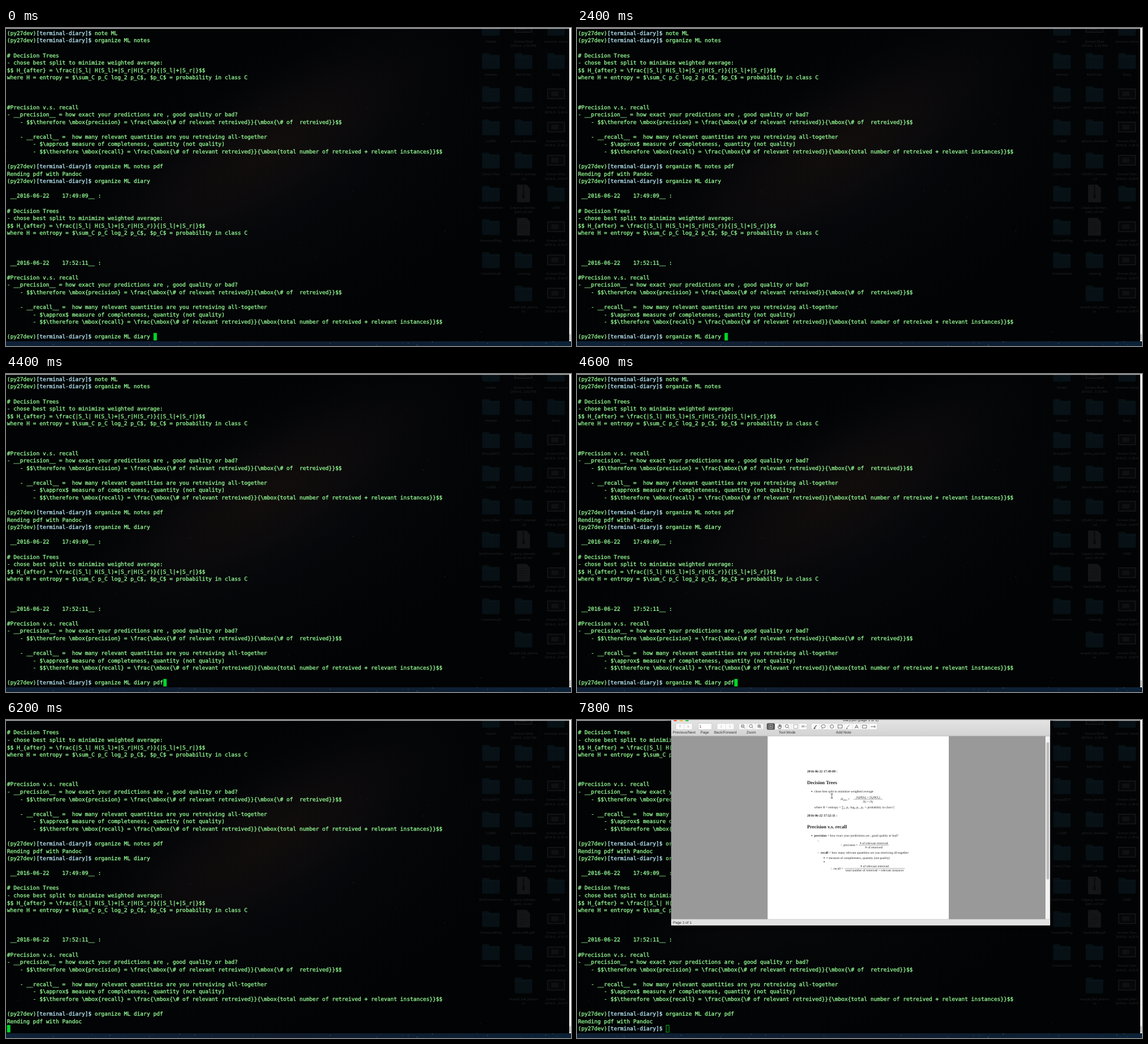
An HTML page for the animation above (8 s loop, 960 px wide and 540 px high).

```html
<!DOCTYPE html>
<html lang="en">
<head>
<meta charset="utf-8">
<title>Terminal diary</title>
<style>
html, body { margin: 0; width: 100%; height: 100%; overflow: hidden; background: #020304; }
svg { display: block; width: 100vw; height: 100vh; }
text { white-space: pre; text-rendering: geometricPrecision; }
.term { font: 9.19px "DejaVu Sans Mono", monospace; fill: #92f892; stroke: #92f892; stroke-width: .32; }
.dir { fill: #b6e8f4; stroke: #b6e8f4; }
.label { font: bold 5.6px "Open Sans", sans-serif; fill: #2b2c2e; text-anchor: middle; }
.ui { font: 6.2px "Liberation Sans", Arial, sans-serif; fill: #333; }
.mid { text-anchor: middle; }
.doc { font: 5.45px "Liberation Serif", Times, serif; fill: #222; }
.head { font-size: 8.3px; font-weight: bold; }
.date { font-size: 5.65px; font-weight: bold; }
</style>
</head>
<body>
<svg id="stage" viewBox="0 0 960 540" preserveAspectRatio="none"></svg>
<script>
const LOOP = 8000, STEP = 200;
const COL = 5.532, ROW = 12.57, LEFT = 1.7, BASE = 11.9;
const TYPE = [3200, 3400, 3600], ENTER = 4800, DONE = 7000, OPEN = 7400;

const stage = document.getElementById('stage');
const esc = s => s.replace(/&/g, '&amp;').replace(/</g, '&lt;');
const rect = (x, y, w, h, fill, more = '') =>
  `<rect x="${x}" y="${y}" width="${w}" height="${h}" fill="${fill}" ${more}/>`;
const text = (x, y, s, cls) => `<text x="${x}" y="${y}" class="${cls}">${s}</text>`;
const path = (d, color = '#555', w = .8) =>
  `<path d="${d}" fill="none" stroke="${color}" stroke-width="${w}"/>`;

function rng(seed) {
  return () => (seed = (seed * 16807) % 2147483647) / 2147483647;
}

// Terminal contents
const PROMPT = '(py27dev)[terminal-diary]$ ';
const trees = [
  '# Decision Trees',
  '- chose best split to minimize weighted average:',
  '$$ H_{after} = \\frac{|S_l| H(S_l)+|S_r|H(S_r)}{|S_l|+|S_r|}$$',
  'where H = entropy = $\\sum_C p_C log_2 p_C$, $p_C$ = probability in class C',
  '', '', ''
];
const recall = [
  '#Precision v.s. recall',
  '- __precision__ = how exact your predictions are , good quality or bad?',
  '    - $$\\therefore \\mbox{precision} = \\frac{\\mbox{\\# of relevant retreived}}{\\mbox{\\# of  retreived}}$$',
  '',
  '    - __recall__ =  how many relevant quantities are you retreiving all-together',
  '        - $\\approx$ measure of completeness, quantity (not quality)',
  '        - $$\\therefore \\mbox{recall} = \\frac{\\mbox{\\# of relevant retreived}}{\\mbox{total number of retreived + relevant instances}}$$',
  ''
];
const history = [
  PROMPT + 'note ML', PROMPT + 'organize ML notes', '',
  ...trees, ...recall,
  PROMPT + 'organize ML notes pdf', 'Rending pdf with Pandoc',
  PROMPT + 'organize ML diary', '',
  ' __2016-06-22    17:49:09__ :', '', ...trees,
  ' __2016-06-22    17:52:11__ :', '', ...recall
];

function line(s, row) {
  const body = esc(s).replace('[terminal-diary]$', '<tspan class="dir">$&</tspan>');
  return s && text(LEFT, (BASE + row * ROW).toFixed(2), body, 'term');
}

// Dimmed desktop behind the terminal
function stars(n, seed, top, height, color, alpha) {
  const r = rng(seed);
  let out = '';
  for (let i = 0; i < n; i++) {
    out += `<circle cx="${(r() * 957).toFixed(1)}" cy="${(top + r() * height).toFixed(1)}" r="${(.3 + r() * .5).toFixed(2)}" fill="${color}" opacity="${(r() * alpha).toFixed(2)}"/>`;
  }
  return out;
}

const icons = {
  f: (x, y) => `<path d="M${x - 15} ${y + 12}v-23q0-2 2-2h9l3 3h14q2 0 2 2v20q0 2-2 2h-26q-2 0-2-2" fill="#0b1c24"/>` +
    rect(x - 15, y - 8, 30, 1, '#12272f'),
  s: (x, y) => rect(x - 15, y - 9, 30, 18, '#27292b') + rect(x - 13.5, y - 7.5, 27, 15, '#0a0b0d') +
    rect(x - 8, y - 4, 12, 8, '#1b1c1e'),
  d: (x, y) => `<path d="M${x - 11} ${y - 15}h16l6 6v24h-22z" fill="#222527"/>` +
    path(`M${x - 7} ${y - 7}h11m-11 4h14m-14 4h14m-14 4h14m-14 4h9`, '#15181a'),
  z: (x, y) => `<path d="M${x - 11} ${y - 15}h16l6 6v24h-22z" fill="#222527"/>` +
    path(`M${x} ${y - 14}v16`, '#0d0f10', 2) + rect(x - 2, y + 2, 4, 6, '#0d0f10')
};
const shot = s => 's:Screen Shot/2016-0...' + s;
const desktop = [
  ['f:Studio', 'f:memos', 'f:Group2017', 'f:LLZ0K', 'f:Curio_Files', 'f:StatFormation', 'f:PersonalPlog', 'f:CreationLab'],
  [shot('3.52 PM'), 'f:Red Print', 'f:extra_journal', 'f:phone_shielded', 'f:LEGACY_stamps/_v2',
    'z:Legacy_stamps_/pats_v2.tar', 'd:hw4cs189.pdf', 'f:_moving', 'f:stupid_kid_pheno/cs'],
  ['f:seminar notes', 'f:Daily', shot('3.48 A'), shot('2.38 A'), shot('0.09 P'), 'f:LABS',
    shot('4.35 P'), shot('4.43 P'), shot('4.09 P')]
];

function drawDesktop() {
  let out = '';
  desktop.forEach((items, c) => items.forEach((item, r) => {
    const x = 824 + c * 55.3, y = -1 + r * 56.4;
    out += icons[item[0]](x, y);
    item.slice(2).split('/').forEach((s, i) => out += text(x, y + 25.5 + i * 7.5, s, 'label'));
  }));
  return `<g opacity=".55">${out}</g>`;
}

// PDF viewer window
const sub = s => s.replace(/_(\w+)/g, '<tspan baseline-shift="-1" font-size="3.8">$1</tspan>')
  .replace(/\*(\w)/g, '<tspan font-style="italic">$1</tspan>');
const doc = (x, y, s, cls = '') => text(x, y, sub(s), 'doc ' + cls);
const dot = (x, y) => `<circle cx="${x}" cy="${y}" r=".9" fill="#222"/>`;

function fraction(x, w, y, top, bottom) {
  return doc(x + w / 2, y - 1.7, top, 'mid') + doc(x + w / 2, y + 5.2, bottom, 'mid') +
    path(`M${x} ${y}h${w}`, '#333', .4);
}

function buttons(x, w, n) {
  let out = rect(x, 5, w, 10.5, '#fbfbfb', 'rx="2" stroke="#bbb" stroke-width=".5"');
  for (let i = 1; i < n; i++) out += path(`M${x + w * i / n} 5v10.5`, '#ccc', .5);
  return out;
}

const lens = (x, sign = '') =>
  `<circle cx="${x}" cy="9.6" r="2.6" fill="none" stroke="#555" stroke-width=".8"/>` +
  path(`M${x + 2} 11.6l2 2${sign}`);

function drawToolbar() {
  const labels = [[182, 'Previous/Next'], [217, 'Page'], [252, 'Back/Forward'],
    [296, 'Zoom'], [357, 'Tool Mode'], [453, 'Add Note']];
  return rect(160, -10, 644, 36.5, 'url(#bar)') +
    ['#f66158', '#f7be40', '#3fc24c'].map((c, i) => `<circle cx="${167 + i * 10}" cy="-1.7" r="3.3" fill="${c}"/>`).join('') +
    text(482, 1.6, 'diary.pdf (page 1 of 1)', 'ui mid') +
    buttons(168, 28, 2) + path('M175 12v-4m-2 2l2-2l2 2M189 8v4m-2-2l2 2l2-2', '#bbb') +
    rect(206, 5, 23, 10.5, '#fff', 'stroke="#aaa" stroke-width=".5"') + text(208, 12.6, '1', 'ui') +
    buttons(238, 29, 2) + path('M246 8l-2 2.3l2 2.3M259 8l2 2.3l-2 2.3', '#bbb') +
    buttons(275, 42, 3) + lens(281.5, 'M280 9.6h3') + lens(295.5) + lens(309.5, 'M308 9.6h3M309.5 8.1v3') +
    buttons(323, 68, 5) + rect(322.5, 4.8, 13.6, 11, '#555', 'rx="2"') +
    rect(326, 7, 6.6, 6.5, 'none', 'stroke="#eee" stroke-width=".5"') +
    '<text x="329.3" y="12.4" class="ui mid" style="fill:#fff;font-size:5.5px">A</text>' +
    path('M341 10l2 4h3l1-3v-3m-4 3v-4m1.5 4v-4.5m1.5 4.5v-4', '#555', 1) + lens(356.5) +
    rect(368, 7, 7, 6.5, 'none', 'stroke="#555" stroke-width=".8" stroke-dasharray="1 .8"') +
    text(384, 12.6, 'H', 'ui mid') + path('M388 9.5l1 1.5l1-1.5', '#555', .6) +
    buttons(398, 112, 8) +
    path('M403 13l4-5M402 13.5h3', '#555', 1.3) +
    '<g fill="none" stroke="#555" stroke-width=".8"><ellipse cx="418.5" cy="9.8" rx="3.6" ry="2.7"/>' +
    '<circle cx="433" cy="10.2" r="3"/><rect x="443.5" y="7.4" width="7" height="5.6"/></g>' +
    path('M417 12.5l-1 2M458 13l5-5.5M457 13.8h3M472 13.5l3-6l3 6M473 11.5h4M485 8h7v5h-7zM499 10.5h8m-2-2l2 2l-2 2') +
    labels.map(([x, s]) => text(x, 22.3, s, 'ui mid')).join('') +
    path('M160 26.3h644', '#aaa', .6);
}

function drawPage() {
  return doc(391, 88, '2016-06-22 17:49:09 :', 'date') +
    doc(391, 108, 'Decision Trees', 'head') +
    dot(399, 120.5) + doc(403, 121.8, 'chose best split to minimize weighted average:') +
    doc(448, 135.5, '*H_after =') +
    fraction(470, 49, 133.6, '|*S_l|*H(*S_l) + |*S_r|*H(*S_r)', '|*S_l| + |*S_r|') +
    doc(403, 149.5, 'where H = entropy = ∑_C *p_C log_2 *p_C, *p_C = probability in class C') +
    doc(391, 163.5, '2016-06-22 17:52:11 :', 'date') +
    doc(391, 183.5, 'Precision v.s. recall', 'head') +
    dot(399, 195.5) + doc(403, 197, '<tspan font-weight="bold">precision</tspan> = how exact your predictions are , good quality or bad?') +
    doc(408.5, 206, '–') + doc(448, 213.5, '∴ precision =') +
    fraction(479, 51, 211.7, '# of relevant retreived', '# of retreived') +
    doc(408.5, 226, '–') + doc(414, 226, '<tspan font-weight="bold">recall</tspan> = how many relevant quantities are you retreiving all-together') +
    dot(420, 233.3) + doc(423.5, 234.8, '≈ measure of completeness, quantity (not quality)') +
    dot(420, 239.8) + doc(431, 253, '∴ recall =') +
    fraction(454.5, 102.5, 251.3, '# of relevant retreived', 'total number of retreived + relevant instances');
}

function drawViewer() {
  return rect(160, -10, 644, 358, '#999', 'rx="3" filter="url(#shadow)"') +
    rect(160, 26, 644, 312, '#999') + rect(323.5, 26, 308.5, 311.5, '#fff') +
    path('M323.3 26v311.5M632.2 26v311.5', '#777', .5) +
    rect(796, 26.5, 7.5, 311, '#f3f3f3') + rect(797.7, 37, 4.4, 233, '#bcbcbc', 'rx="2.2"') +
    rect(160, 337.5, 644, 10.5, '#e2e2e2') + text(163, 345.2, 'Page 1 of 1', 'ui') +
    drawToolbar() + drawPage();
}

stage.innerHTML = `
<defs>
  <radialGradient id="core"><stop offset="0" stop-color="#130e0b" stop-opacity=".9"/><stop offset=".45" stop-color="#0f0c0d" stop-opacity=".65"/><stop offset="1" stop-color="#08090c" stop-opacity="0"/></radialGradient>
  <radialGradient id="haze"><stop offset="0" stop-color="#080a0e" stop-opacity=".8"/><stop offset="1" stop-color="#05070a" stop-opacity="0"/></radialGradient>
  <linearGradient id="sky"><stop offset="0" stop-color="#0e2137"/><stop offset=".5" stop-color="#101c2e"/><stop offset="1" stop-color="#0b2136"/></linearGradient>
  <linearGradient id="bar" x2="0" y2="1"><stop offset="0" stop-color="#e8e8e8"/><stop offset="1" stop-color="#d3d3d3"/></linearGradient>
  <filter id="shadow" x="-10%" y="-10%" width="120%" height="125%"><feDropShadow dx="0" dy="5" stdDeviation="7" flood-color="#000" flood-opacity=".6"/></filter>
</defs>
${rect(0, 0, 960, 540, '#020304')}
<ellipse cx="480" cy="270" rx="560" ry="250" fill="url(#haze)" transform="rotate(-28 480 270)"/>
<ellipse cx="450" cy="205" rx="400" ry="130" fill="url(#core)" transform="rotate(-31 450 205)"/>
${stars(110, 41, 3, 525, '#6d7686', .35)}
${drawDesktop()}
${rect(0, 532, 960, 8, 'url(#sky)')}${stars(60, 77, 532, 8, '#7fa6c8', .7)}
${rect(0, 0, 957, 1.3, '#bdbdbd')}${rect(957, 0, 3, 532, '#f4f4f4')}${rect(957.5, 520, 2, 10, '#bbb')}
<g id="log">${history.map(line).join('')}</g>
<g id="tail"></g>
<rect id="cursor" stroke="#00d826"/>
<g id="viewer">${drawViewer()}</g>
<path id="arrow" d="M431 128v8.5l2-1.8l1.4 3.2l1.4-.6l-1.4-3.1h2.7z" fill="#111" stroke="#ccc" stroke-width=".6"/>
<g id="beam">${path('M431 125q2 0 2 1.2q0-1.2 2-1.2M433 126v6M431 133q2 0 2-1.2q0 1.2 2 1.2', '#222', .7)}</g>`;

const el = id => document.getElementById(id);
const [log, tail, cursor, viewer, arrow, beam] = ['log', 'tail', 'cursor', 'viewer', 'arrow', 'beam'].map(el);
const show = (node, on) => node.setAttribute('display', on ? 'inline' : 'none');
const set = (node, attrs) => { for (const k in attrs) node.setAttribute(k, attrs[k]); };

// The first two lines scroll away on Enter.
const gone = [...log.children].slice(0, 2);
let last = -1;

function render(time) {
  const t = Math.floor((time % LOOP) / STEP) * STEP;
  if (t === last) return;
  last = t;

  const entered = t >= ENTER, done = t >= DONE, opened = t > OPEN;
  const command = PROMPT + 'organize ML diary ' + 'pdf'.slice(0, TYPE.filter(k => t >= k).length);
  const rows = entered ? [command, 'Rending pdf with Pandoc', done ? PROMPT : ''] : [command];
  const first = 42 - rows.length;
  log.setAttribute('transform', `translate(0 ${entered ? -2 * ROW : 0})`);
  gone.forEach(node => show(node, !entered));
  tail.innerHTML = rows.map((s, i) => line(s, first + i)).join('');

  const x = LEFT + rows[rows.length - 1].length * COL;
  set(cursor, opened
    ? { x: x + .4, y: 518.3, width: 4.8, height: 11.8, fill: 'none', 'stroke-width': .8 }
    : { x, y: 517.8, width: COL + .2, height: 12.8, fill: '#00d826', 'stroke-width': 0 });

  // Zoom and fade in from the window's centre
  const p = t < OPEN ? 0 : Math.min(1, (t - OPEN) / 400);
  const ease = 1 - (1 - p) ** 4;
  const scale = .503 + .497 * ease;
  show(viewer, t >= OPEN);
  set(viewer, {
    opacity: .04 + .96 * ease,
    transform: `translate(482 170) scale(${scale}) translate(-482 ${-170 + .8 * ease})`
  });
  show(arrow, t === OPEN);
  show(beam, opened);
}

function tick(now) {
  render(now);
  requestAnimationFrame(tick);
}
render(0);
requestAnimationFrame(tick);
</script>
</body>
</html>
```
